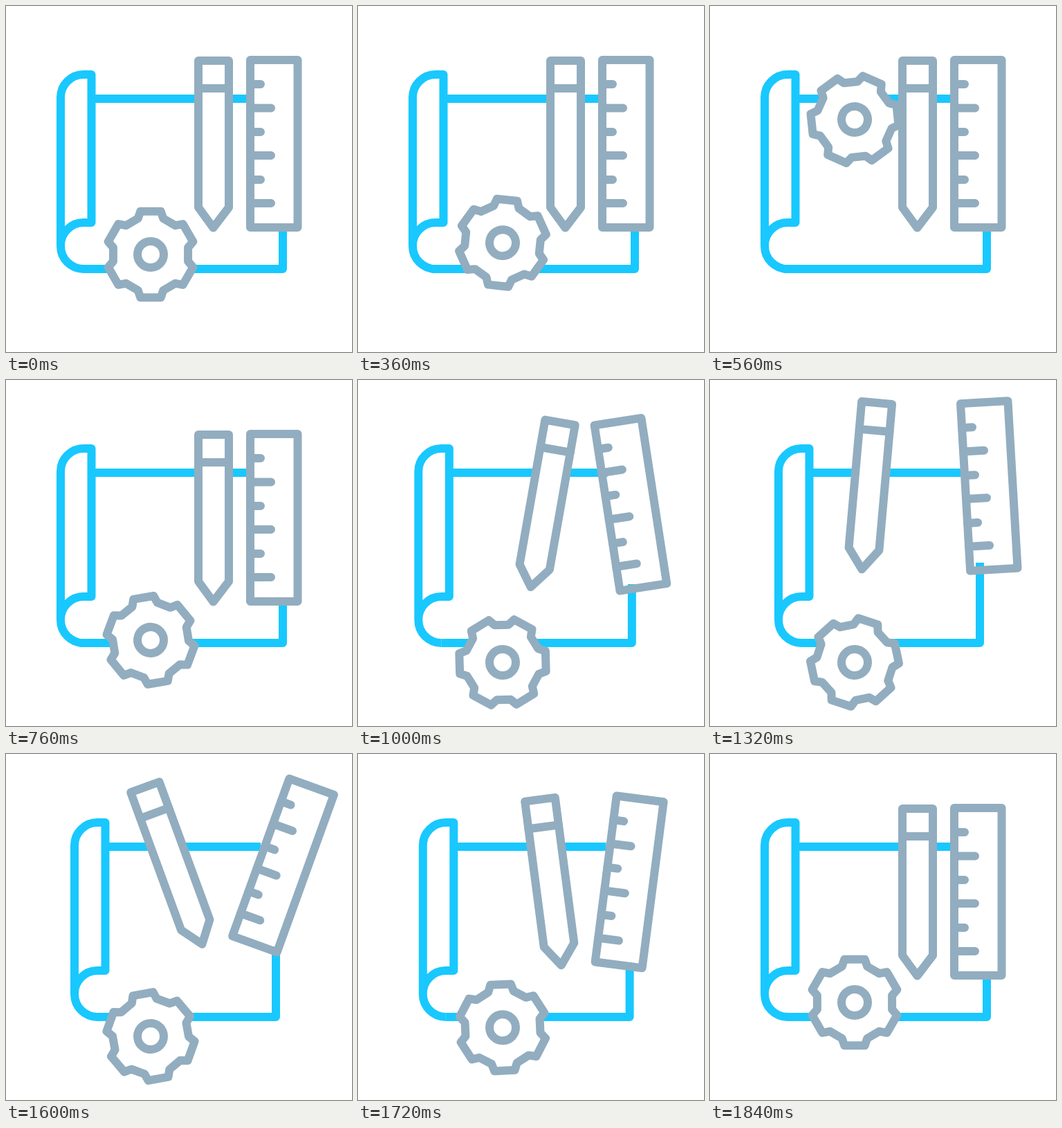
An HTML page for the animation above (2000 ms loop, 500x500 px).

```html
<!DOCTYPE html>
<html>
<head>
<meta charset="utf-8">
<style>
  html, body { margin: 0; width: 100%; height: 100%; overflow: hidden; background: #fff; }
  svg { display: block; width: 100%; height: 100%; }
</style>
</head>
<body>
<svg viewBox="0 0 500 500" fill="none" stroke-width="12" stroke-linejoin="round">
  <g stroke="#18c8ff">
    <path id="sheet"/>
    <path id="scroll" d="M112 380A33 33 0 0 1 79 347V132A33 33 0 0 1 112 99H123.500V313H112A33 33 0 0 0 79 346"/>
  </g>
  <g stroke="#92adbf" stroke-linecap="round">
    <g id="gear">
      <path id="teeth" fill="#fff"/>
      <circle r="19"/>
    </g>
    <g id="pencil">
      <path fill="#fff" d="M278 79H322V291L299.500 320.500L278 291Z"/>
      <path d="M278 119H322"/>
    </g>
    <g id="ruler">
      <path d="M353 78H421.500V320H353Z"/>
      <path d="M353 113h15M353 147.500h30M353 182h15M353 216h30M353 251h15M353 285h30"/>
    </g>
  </g>
</svg>
<script>
const LOOP = 2000, STEP = 40;
const $ = id => document.getElementById(id);
const set = (id, name, value) => $(id).setAttribute(name, value);

// Keys are [time, value] pairs, eased in and out between neighbours.
function track(t, ...keys) {
  if (t <= keys[0][0]) return keys[0][1];
  for (let i = 1; i < keys.length; i++) {
    const [t0, a] = keys[i - 1], [t1, b] = keys[i];
    if (t < t1) {
      const x = (t - t0) / (t1 - t0);
      return a + (b - a) * x * x * (3 - 2 * x);
    }
  }
  return keys[keys.length - 1][1];
}

function gearOutline() {
  const points = [];
  for (let tooth = 0; tooth < 360; tooth += 60) {
    for (const [r, offset] of [[55, -19.5], [64, -13.3], [64, 13.3], [55, 19.5]]) {
      const a = (tooth + offset) * Math.PI / 180;
      points.push([r * Math.sin(a), -r * Math.cos(a)].map(v => v.toFixed(2)));
    }
  }
  return `M${points.join("L")}Z`;
}

function placeTool(id, dx, dy, angle, cx, cy) {
  set(id, "transform", `translate(${dx} ${dy}) rotate(${angle} ${cx} ${cy})`);
}

function draw(t) {
  const swing = (first, second, rest = 0) =>
    track(t, [860, rest], [1175, first], [1514, second], [1840, rest]);
  const lift = swing(1, 1);
  const squeeze = track(t, [860, 0], [1175, 1], [1660, 1], [1840, 0]);

  const left = 20 * squeeze;
  set("scroll", "transform", `translate(${left} 0)`);
  set("sheet", "d", `M${123 + left} 134H${353 + 18 * lift}` +
    `M${112 + left} 380H${400 - 10 * squeeze}V${swing(260, 270, 320)}`);

  const gearY = track(t, [330, 359], [505, 144], [831, 408], [1660, 408], [1840, 359]);
  const spin = track(t, [180, 0], [1840, 180]);
  set("gear", "transform", `translate(209 ${gearY}) rotate(${spin})`);

  placeTool("pencil", -69.5 * lift, -46.5 * lift, swing(24, -24.3), 300, 200);
  placeTool("ruler", 16 * lift, -46 * lift, swing(-21, 24), 387, 199);
}

function tick() {
  const t = performance.now() % LOOP;
  draw(Math.floor(t / STEP) * STEP);
  requestAnimationFrame(tick);
}

set("teeth", "d", gearOutline());
tick();
</script>
</body>
</html>
```
